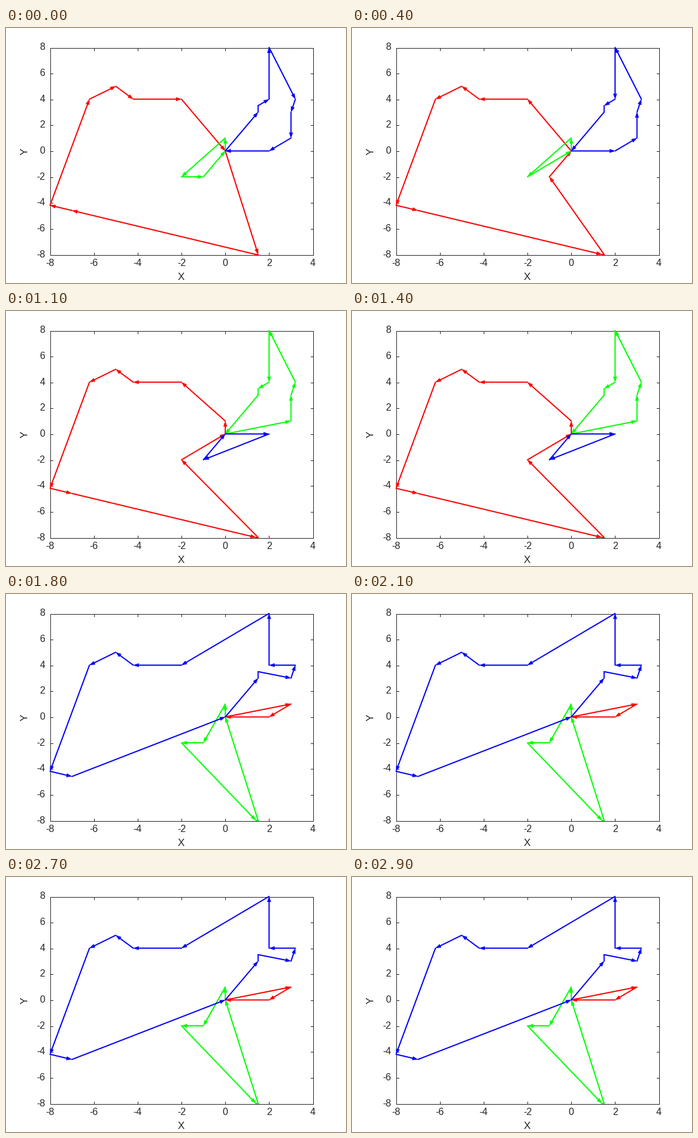
Recreate the animation shown at these times as a matplotlib script. Size 560 by 420 pixels, loop 3000 ms.

```python
import numpy as np
import matplotlib.pyplot as plt
from matplotlib.animation import FuncAnimation
from matplotlib.patches import Polygon, Rectangle

W, H, DPI = 560, 420, 100
PX = 72 / DPI
LEFT, RIGHT, TOP, BOTTOM = 72.5, 505.5, 32.5, 373.5
INK = "#262626"
RED, GREEN, BLUE = "#ff0000", "#00ff00", "#0000ff"

# Stops visited by the three routes; every route starts and ends at the depot.
STOPS = {
    "a": (-2, 4), "b": (-4.2, 4), "c": (-5, 5), "d": (-6.2, 4),
    "e": (-8, -4.2), "f": (-7, -4.6), "g": (1.5, -8), "s": (1.4, -8),
    "h": (-1, -2), "i": (-2, -2), "j": (0, 1), "k": (2, 0), "l": (3, 1),
    "m": (3, 3), "n": (3.2, 4), "o": (2, 8), "p": (2, 4), "q": (1.5, 3.5),
    "r": (1.5, 3), "0": (0, 0),
}

# (start in ms, red route, green route, blue route)
PLANS = [
    (0, "gsfedcba", "jih", "rqponmlk"),
    (100, "abcdefsgh", "ji", "klmnopqr"),
    (800, "jabcdefsgi", "lmnopqr", "kh"),
    (1600, "lk", "jhisg", "rqmnpoabcdef"),
]

STEP, LOOP = 100, 3000
HEAD, HALF = 9, 3.0

fig = plt.figure(figsize=(W / DPI, H / DPI), dpi=DPI, facecolor="white")
ax = fig.add_axes([0, 0, 1, 1])
ax.set_xlim(0, W)
ax.set_ylim(H, 0)
ax.axis("off")


def to_px(x, y):
    return np.array([LEFT + (x + 8) * (RIGHT - LEFT) / 12,
                     TOP + (8 - y) * (BOTTOM - TOP) / 16])


def label(x, y, s, size=16, **kw):
    ax.text(x, y, s, fontsize=size * PX, family="Liberation Sans",
            color=INK, **kw)


def rule(x0, y0, x1, y1):
    ax.plot([x0, x1], [y0, y1], color=INK, lw=PX, zorder=1, snap=True)


def draw_axes():
    ax.add_patch(Rectangle((LEFT, TOP), RIGHT - LEFT, BOTTOM - TOP, fill=False,
                           ec=INK, lw=PX, zorder=1, snap=True))
    for v in range(-8, 5, 2):
        x = to_px(v, 0)[0]
        rule(x, BOTTOM, x, BOTTOM - 4)
        rule(x, TOP, x, TOP + 4)
        label(x, 392.5, str(v), ha="center", va="baseline")
    for v in range(-8, 9, 2):
        y = to_px(0, v)[1]
        rule(LEFT, y, LEFT + 4, y)
        rule(RIGHT, y, RIGHT - 4, y)
        label(64.5, y + 4, str(v), ha="right", va="baseline")
    label(288.5, 415, "X", 17, ha="center", va="baseline")
    label(38.5, 203, "Y", 17, ha="right", va="center", rotation=90)


def arrow(p, q, color, z):
    """Return a line from p to q, with a head when there is room for one."""
    d = q - p
    size = np.hypot(*d)
    u = d / size
    parts = []
    end = q
    if size > 1.5 * HEAD:
        side = HALF * np.array([-u[1], u[0]])
        base = q - HEAD * u
        parts.append(ax.add_patch(Polygon([q, base + side, base - side],
                                          fc=color, ec=color, lw=0.3 * PX,
                                          zorder=z, snap=False)))
        end = q - 0.4 * HEAD * u
    parts += ax.plot(*zip(p, end), color=color, lw=2 * PX, zorder=z,
                     solid_capstyle="round", snap=False)
    return parts


def draw_plan(routes):
    parts = []
    for z, (route, color) in enumerate(zip(routes, (RED, GREEN, BLUE)), 2):
        # centre level lines on a pixel row
        pts = [to_px(*STOPS[s]) - (0, 0.5) for s in "0" + route + "0"]
        for p, q in zip(pts, pts[1:]):
            parts += arrow(p, q, color, z)
    return parts


draw_axes()
plans = [(start, draw_plan(routes)) for start, *routes in PLANS]


def update(i):
    t = i * STEP
    current = max(k for k, (start, _) in enumerate(plans) if start <= t)
    for k, (_, parts) in enumerate(plans):
        for part in parts:
            part.set_visible(k == current)
    return []


anim = FuncAnimation(fig, update, frames=LOOP // STEP, interval=STEP,
                     init_func=lambda: update(0), repeat=True, repeat_delay=0)
plt.show()
```
